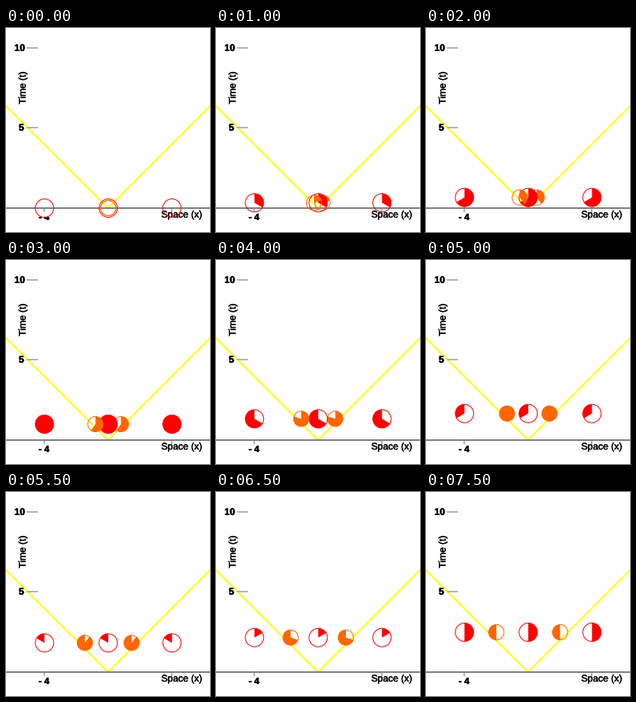
A matplotlib script for the animation above (8000 ms loop, 256 by 256 pixels).

```python
import matplotlib.pyplot as plt
from matplotlib.animation import FuncAnimation
from matplotlib.patches import Circle, Wedge
from matplotlib.patheffects import withStroke

SIZE, FRAMES, INTERVAL = 256, 16, 500
UNIT = 20                 # pixels per unit of space or time
X0, Y0 = 128.3, 226       # origin of the diagram
STEP = 1 / 6              # time per frame
SPEED = 0.8
RED, ORANGE, GREY, PALE = "#ff0000", "#ff6600", "#808080", "#b4b4b4"

plt.rcParams["font.family"] = "Liberation Sans"
fig = plt.figure(figsize=(SIZE / 72, SIZE / 72), dpi=72, facecolor="white")
ax = fig.add_axes([0, 0, 1, 1])
ax.set_xlim(0, SIZE)
ax.set_ylim(SIZE, 0)
ax.axis("off")


def line(xs, ys, color, z=3):
    ax.plot(xs, ys, color=color, lw=2, zorder=z, solid_capstyle="butt")


def label(x, y, text, size=12, z=4, va="center_baseline", **kw):
    ax.text(x, y, text, fontsize=size, ha="center", va=va, zorder=z,
            path_effects=[withStroke(linewidth=0.4, foreground="black")], **kw)


class Clock:
    """A dial that fills clockwise on one turn and empties on the next."""

    def __init__(self, x, speed, radius, color, z):
        self.x, self.speed = x, speed
        self.rate = (1 - speed ** 2) ** 0.5
        pos = (X0, Y0)
        self.back = Circle(pos, radius, fc="white", ec="none", zorder=2)
        self.fill = Wedge(pos, radius, 0, 0, fc=color, ec="none", zorder=z)
        self.rim = Circle(pos, radius, fc="none", ec=color, lw=1, zorder=z)
        for part in (self.back, self.fill, self.rim):
            ax.add_patch(part)

    def update(self, t):
        pos = (X0 + UNIT * (self.x + self.speed * t), Y0 - UNIT * t)
        self.back.center = self.rim.center = pos
        self.fill.set_center(pos)
        turns = self.rate * t + 1e-9
        lap, part = int(turns), turns % 1
        # with y pointing down, angles grow clockwise from -90 at the top
        start, end = (0, part) if lap % 2 == 0 else (part, 1)
        self.fill.set_visible(end - start > 1e-6)
        if end - start > 1 - 1e-6:
            self.fill.set_theta1(0)
            self.fill.set_theta2(360)
        else:
            self.fill.set_theta1(360 * start - 90)
            self.fill.set_theta2(360 * end - 90)


# light cone, axis and ticks
line([-2, 128, 258], [96, 226, 96], "#ffff00")
line([0, SIZE], [226, 226], GREY, 3.5)
for x in (48, 208):
    line([x, x], [226, 231], PALE)
for y in (25, 125):
    line([26, 40], [y, y], PALE)

label(17.3, 24.3, "10", weight="bold")
label(19.3, 124.3, "5", weight="bold")
label(47.7, 236.5, "- 4", 11.5, 1, weight="bold")
label(220.5, 233.3, "Space (x)")
label(21.5, 75, "Time (t)", va="center", rotation=90)

# the left traveller passes in front, the right one behind
clocks = [Clock(0, SPEED, 9.6, ORANGE, 5)]
clocks += [Clock(x, 0, 11.5, RED, 6) for x in (-4, 0, 4)]
clocks += [Clock(0, -SPEED, 9.6, ORANGE, 7)]


def draw(i):
    for clock in clocks:
        clock.update(i * STEP)
    return []


anim = FuncAnimation(fig, draw, frames=FRAMES, interval=INTERVAL,
                     init_func=lambda: draw(0), repeat=True, repeat_delay=0)
plt.show()
```
